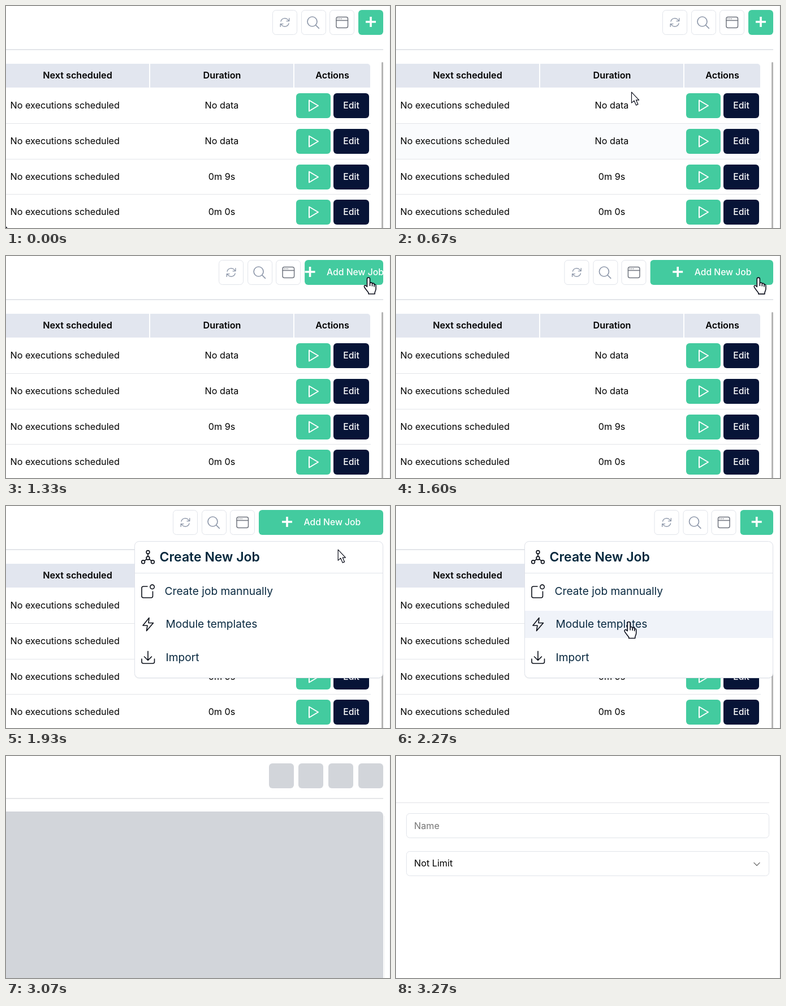
An HTML page for the animation above (3.94 s loop, 679 by 392 pixels).

```html
<!DOCTYPE html>
<html lang="en">
<head>
<meta charset="utf-8">
<title>Create a new job</title>
<style>
  html, body { margin: 0; width: 100%; height: 100%; overflow: hidden; background: #fff; }
  #stage { display: block; width: 679px; height: 392px; font: 16.2px Inter, "Open Sans", sans-serif; }
  .mid { text-anchor: middle; }
  .bold { font-weight: 600; }
  .btn { font-size: 15.7px; font-weight: 550; fill: #fff; }
  .rule { fill: #e3e5e9; }
  .green { fill: #43cb9f; }
  .navy { fill: #071437; }
  .head { fill: #e2e6ef; }
  .box { fill: #fff; stroke: #e1e4ea; }
  .hover { fill: #fafbfd; visibility: hidden; }
  .pick { fill: #f0f3f9; visibility: hidden; }
  .line { fill: none; stroke-linecap: round; stroke-linejoin: round; }
  .soft { stroke: #8f99ab; stroke-width: 1.4; }
  .ink { stroke: #0b0f18; stroke-width: 1.6; }
  .item { font-size: 19.2px; fill: #0a2a41; }
  .bone { fill: #d2d5da; }
  .pointer { fill: #fff; stroke: #0c0f1c; stroke-linejoin: round; }
</style>
</head>
<body>
<svg id="stage" viewBox="0 0 679 392">
  <rect width="679" height="392" fill="#fff"/>
  <rect x="678" width="1" height="392" fill="#efeff1"/>

  <g id="list">
    <rect class="rule" y="76" width="667" height="2"/>
    <rect x="664" y="99" width="3" height="300" rx="1.5" fill="#b5b5b5"/>
    <path class="head" d="M0 102H253V144H0ZM255 102H508V144H255ZM510 102H639a5 5 0 0 1 5 5V144H510Z"/>
    <g class="mid bold">
      <text x="126.5" y="128">Next scheduled</text>
      <text x="382" y="128">Duration</text>
      <text x="577" y="128">Actions</text>
    </g>
    <g id="rows"></g>

    <g id="tools">
      <rect class="box" x="471.5" y="7.5" width="43" height="43" rx="6"/>
      <rect class="box" x="522.5" y="7.5" width="43" height="43" rx="6"/>
      <rect class="box" x="572.5" y="7.5" width="43" height="43" rx="6"/>
      <path class="line soft" d="M486 27a7.3 7.3 0 0 1 12.6-2.6l2 2M500.8 21.8v4.8h-4.8M500 31a7.3 7.3 0 0 1-12.6 2.6l-2-2M485.2 36.4v-4.8h4.8"/>
      <g class="line soft" style="stroke-width:1.7">
        <circle cx="541.5" cy="27.5" r="8.5"/>
        <path d="M547.8 33.8L553.3 39.3"/>
      </g>
      <g class="line" stroke="#70757f" stroke-width="1.5">
        <rect x="584" y="19.5" width="20.5" height="19" rx="3"/>
        <path d="M584 25.5h20.5M587 22.6h.2M590 22.6h.2M593 22.6h.2"/>
      </g>
    </g>

    <svg id="add" y="7" height="44">
      <rect id="addBg" class="green" height="44" rx="6"/>
      <g id="addIn">
        <path id="plus" d="M-9 21H9M0 12V30" stroke="#fff" stroke-width="3.6"/>
        <text id="label" class="btn" x="-30.5" y="27">Add New Job</text>
      </g>
    </svg>

    <g id="menu">
      <rect x="227" y="64" width="440" height="241" rx="8" fill="#1b2b4a" opacity=".05"/>
      <rect class="box" x="227.5" y="62.5" width="439" height="241" rx="8" style="stroke:#dde1e8"/>
      <rect x="228" y="118" width="438" height="1" fill="#e1e4ea"/>
      <rect class="pick" x="228" y="127" width="438" height="48"/>
      <rect class="pick" x="228" y="185" width="438" height="48"/>
      <rect class="pick" x="228" y="244" width="438" height="48"/>
      <g class="line ink">
        <circle cx="251" cy="81.5" r="2.9"/>
        <circle cx="251" cy="92" r="2.9"/>
        <circle cx="242.6" cy="98.8" r="2.9"/>
        <circle cx="259.4" cy="98.8" r="2.9"/>
        <path d="M251 84.5V89M248.6 93.8L245 96.8M253.4 93.8L257 96.8"/>
        <circle cx="258.6" cy="142.8" r="3.7"/>
        <path d="M250 142H243a3 3 0 0 0-3 3V159a3 3 0 0 0 3 3h13.5a3 3 0 0 0 3-3V151"/>
        <path d="M253 197.5L242 211H250L248.5 220.5L260.5 206.5H252Z"/>
        <path d="M251 256.5V272M244.5 266L251 272.5L257.5 266M240 270v5a3 3 0 0 0 3 3h16.5a3 3 0 0 0 3-3v-5"/>
      </g>
      <text class="bold" x="271.5" y="98" font-size="23" fill="#04273c">Create New Job</text>
      <text class="item" x="280.5" y="157">Create job mannually</text>
      <text class="item" x="282.5" y="215">Module templates</text>
      <text class="item" x="282.5" y="274">Import</text>
    </g>
  </g>

  <g id="skeleton">
    <g class="bone">
      <rect x="465" y="13" width="44" height="44" rx="6"/>
      <rect x="517" y="13" width="44" height="44" rx="6"/>
      <rect x="570" y="13" width="44" height="44" rx="6"/>
      <rect x="623" y="13" width="44" height="44" rx="6"/>
      <path d="M0 98H660a7 7 0 0 1 7 7V392H0Z"/>
    </g>
    <rect y="74" width="667" height="2" fill="#e5e6e8"/>
    <rect x="668" y="106" width="2" height="286" fill="#f6f6f7"/>
  </g>

  <g id="form">
    <rect y="82" width="660" height="1" fill="#e2e3e5"/>
    <rect class="box" x="18.5" y="101.5" width="641" height="43" rx="6"/>
    <rect class="box" x="18.5" y="168.5" width="641" height="43" rx="6"/>
    <text x="32" y="129" fill="#757575">Name</text>
    <text x="32" y="195">Not Limit</text>
    <path class="line" d="M633 188.5L638 193.5L643 188.5" stroke="#777" stroke-width="1.4"/>
  </g>

  <g id="cursor">
    <path id="arrow" class="pointer" stroke-width="1.2" d="M0 0V19L4.5 15L8 23L11.4 21.5L8 14H13.2Z"/>
    <path id="hand" class="pointer" stroke-width="1.6" d="M-2.5 2.5a2.5 2.5 0 0 1 5 0V11c0-2.8 4-2.8 4 0v1c0-2.5 3.6-2.5 3.6.3v1.2c0-2 3-1.7 3 .6V20c0 3-2 5-2 7v2H0v-2C-2 24-5 21-7.3 17c-1.2-2.5 1.2-4 3.2-2.4l1.6 1.6ZM2.5 11v4M6.5 12v3.5M10.1 13.5v3"/>
  </g>
</svg>

<script>
const LOOP = 3940, TICK = 200 / 3;
const $ = id => document.getElementById(id);
const show = (el, on) => { el.style.visibility = on ? "inherit" : "hidden"; };
const clamp = u => Math.min(1, Math.max(0, u));

// Table rows: vertical centre and duration
const rows = [[176, "No data"], [239, "No data"], [302, "0m 9s"], [364, "0m 0s"]];
const ruleTop = i => Math.floor(207.5 + 62.5 * i);
$("rows").innerHTML = rows.map(([y, time], i) => `
  <rect class="hover" y="${ruleTop(i) - 62}" width="645" height="62"/>
  <rect class="rule" y="${ruleTop(i)}" width="645" height="1"/>
  <text x="7.5" y="${y + 5}">No executions scheduled</text>
  <text class="mid" x="381.5" y="${y + 5}">${time}</text>
  <rect class="green" x="513" y="${y - 22}" width="61" height="44" rx="6"/>
  <path class="line" d="M536 ${y - 9.5}l16 9.5l-16 9.5Z" stroke="#fff" stroke-width="2"/>
  <rect class="navy" x="579" y="${y - 22}" width="63" height="44" rx="6"/>
  <text class="mid btn" x="610.5" y="${y + 5}">Edit</text>`).join("");
const rowHovers = document.querySelectorAll(".hover");
const picks = document.querySelectorAll(".pick");
const pickTops = [127, 185, 244];

const quart = u => u < .5 ? 8 * u ** 4 : 1 - 8 * (1 - u) ** 4;

// The CSS "ease" curve
function ease(u) {
  if (u <= 0 || u >= 1) return clamp(u);
  let lo = 0, hi = 1, s;
  for (let i = 0; i < 24; i++) {
    s = (lo + hi) / 2;
    if (.75 * s * (1 - s) + s ** 3 < u) lo = s; else hi = s;
  }
  return .3 * s * (1 - s) ** 2 + 3 * s * s * (1 - s) + s ** 3;
}

// Pointer moves: first tick, start, length, from, to
const moves = [
  [0, 1.27, 16, [0, 390], [632, 29]],
  [17, 22.46, 16, [641, 38], [400, 213]],
  [40, 40.2, 8, [400, 213], [0, 421]]
];

function pointerAt(n) {
  const [, start, length, a, b] = moves.filter(m => m[0] <= n).pop() || moves[0];
  const p = quart(clamp((n - start) / length));
  return [a[0] + (b[0] - a[0]) * p, a[1] + (b[1] - a[1]) * p];
}

const itemAt = (x, y) => x > 228 && x < 666 ? pickTops.findIndex(top => y >= top && y < top + 48) : -1;

function draw(n) {
  const menuOpen = n >= 25;
  show($("list"), n < 46);
  show($("skeleton"), n >= 46 && n < 49);
  show($("form"), n >= 49);
  show($("menu"), menuOpen && n < 46);

  const width = n < 29.1
    ? 44 + 176 * ease((n - 17.65) / 7.5)
    : 220 - 176 * ease((n - 29.1) / 7.5);
  const open = n > 17 && n < 30;
  $("add").setAttribute("x", 667 - width);
  $("add").setAttribute("width", width);
  $("addBg").setAttribute("width", width);
  $("addIn").setAttribute("transform", `translate(${width / 2})`);
  $("plus").setAttribute("transform", `translate(${open ? -60 : 0})`);
  $("tools").setAttribute("transform", `translate(${44 - width})`);
  show($("label"), open);

  // Hover colours trail the pointer by one tick
  const [x, y] = pointerAt(n);
  const [px, py] = pointerAt(n - 1);
  const listed = n > 0 && n < 46;
  rowHovers.forEach((el, i) => show(el, listed && !menuOpen && Math.abs(py - rows[i][0]) < 31.5));
  const item = itemAt(px, py);
  picks.forEach((el, i) => show(el, listed && menuOpen && i === item));

  const onButton = n >= 17 && y < 51 && x > 667 - width;
  const hand = onButton || menuOpen && itemAt(x, y) >= 0;
  show($("cursor"), n < 46);
  show($("hand"), hand);
  show($("arrow"), !hand);
  $("cursor").setAttribute("transform", `translate(${x} ${y})`);
}

const begin = performance.now();
function loop() {
  const t = (performance.now() - begin) % LOOP;
  draw(Math.floor((t + 4) / TICK));
  requestAnimationFrame(loop);
}
loop();
</script>
</body>
</html>
```
